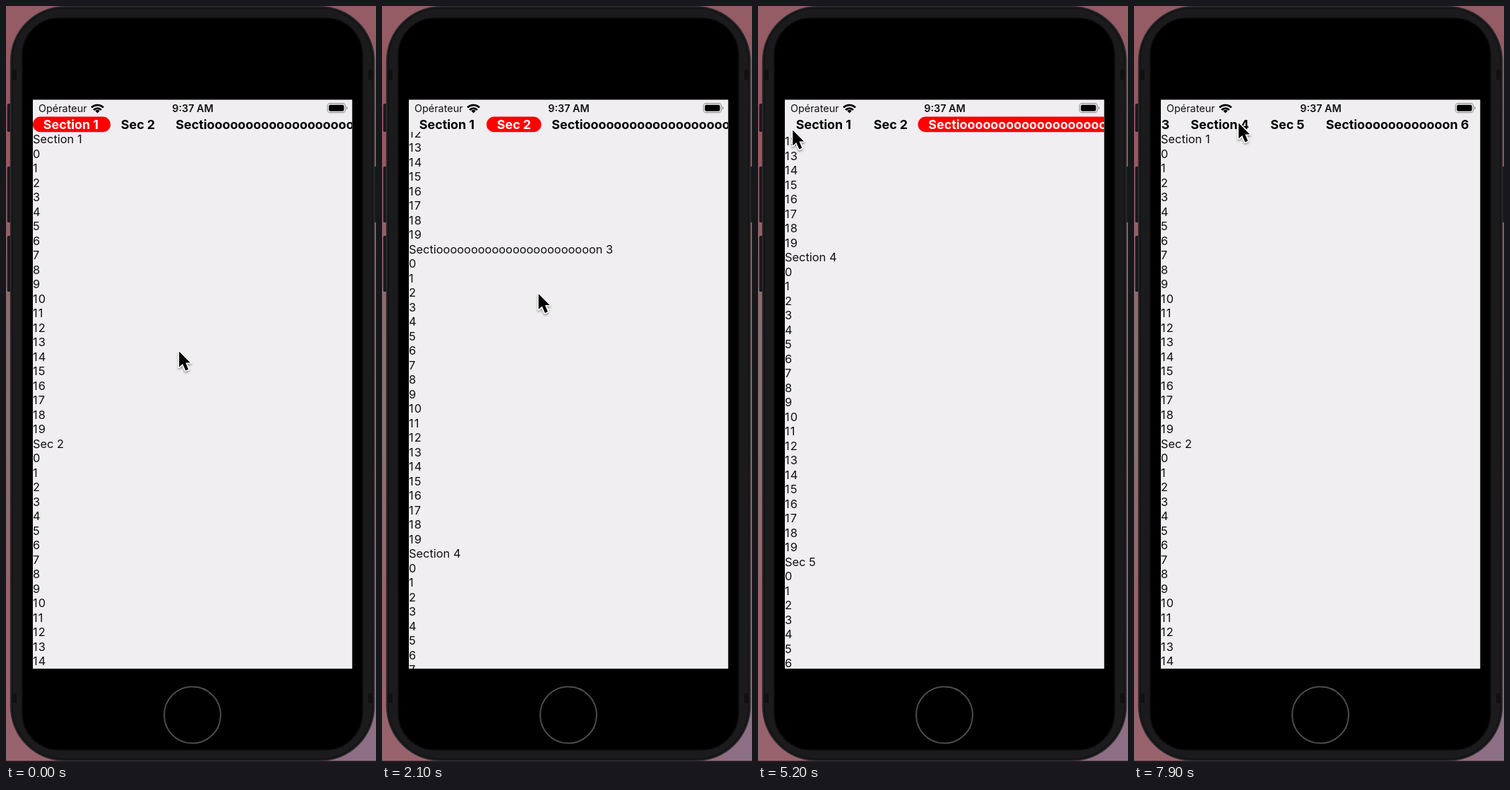
An HTML page for the animation above (8000 ms loop, 524 px wide and 1069 px high).

```html
<!DOCTYPE html>
<html lang="fr">
<head>
<meta charset="utf-8">
<title>Section tabs</title>
<style>
html, body { margin: 0; width: 100%; height: 100%; overflow: hidden; background: #8d6067; }
svg { display: block; width: 100%; height: 100%; }
text { font-family: Inter, "Open Sans", sans-serif; white-space: pre; }
.row { font-size: 16.4px; fill: #111; }
.number { letter-spacing: 1px; }
.tab { font-size: 17.87px; font-weight: 700; }
.status { font-size: 14.4px; fill: #111; }
</style>
</head>
<body>
<svg viewBox="0 0 524 1069">
  <defs>
    <linearGradient id="wall" x2="0" y2="1">
      <stop offset="0" stop-color="#945c65"/>
      <stop offset=".2" stop-color="#98595f"/>
      <stop offset=".42" stop-color="#8a6d6e"/>
      <stop offset=".58" stop-color="#89706f"/>
      <stop offset=".8" stop-color="#9b6168"/>
      <stop offset="1" stop-color="#98636d"/>
    </linearGradient>
    <radialGradient id="dusk" cx="1" cy="1" r=".45">
      <stop offset="0" stop-color="#8c7088"/>
      <stop offset="1" stop-color="#8c7088" stop-opacity="0"/>
    </radialGradient>
    <clipPath id="listClip"><rect x="38" y="178" width="452" height="759"/></clipPath>
    <clipPath id="tabClip"><rect x="38" y="154" width="452" height="26"/></clipPath>
    <filter id="shadow" x="-50%" y="-50%" width="200%" height="200%">
      <feDropShadow dx="0" dy="2" stdDeviation="1.8" flood-opacity=".4"/>
    </filter>
  </defs>

  <rect width="524" height="1069" fill="url(#wall)"/>
  <rect width="524" height="1069" fill="url(#dusk)"/>
  <rect y="1067.5" width="524" height="1.5" fill="#1b1517"/>
  <g fill="#19191b">
    <rect x="1.7" y="138" width="9" height="40" rx="2"/>
    <rect x="1.7" y="227" width="9" height="79" rx="2"/>
    <rect x="1.7" y="325" width="9" height="79" rx="2"/>
    <rect x="516" y="227" width="9" height="79" rx="2"/>
  </g>
  <rect x="6.5" y=".7" width="515" height="1066.6" rx="77" fill="#1b1b1d" stroke="#2e2e31" stroke-width="1.5"/>
  <rect x="9" y="3.2" width="510" height="1061.6" rx="74" fill="none" stroke="#141416" stroke-width="2"/>
  <g fill="#111112">
    <rect x="8" y="90" width="7" height="14"/><rect x="513" y="90" width="7" height="14"/>
    <rect x="8" y="972" width="7" height="14"/><rect x="513" y="972" width="7" height="14"/>
  </g>
  <rect x="23" y="17" width="482" height="1035" rx="52" stroke="#0d0d0e" stroke-width="1.5"/>
  <circle cx="264" cy="1002.5" r="40" fill="none" stroke="#4c4c4c" stroke-width="2"/>
  <rect x="38" y="132.5" width="452.3" height="804.5" fill="#f0eef1"/>

  <text class="status" x="46" y="150">Opérateur</text>
  <text class="status" x="264.5" y="150" text-anchor="middle" font-weight="600">9:37 AM</text>
  <g fill="none" stroke="#000" stroke-width="2.8">
    <path d="M121 143.6a12 12 0 0 1 17 0M124.1 147a7.6 7.6 0 0 1 10.8 0"/>
    <path d="M129.5 151.6l-3.2-3.3a4.5 4.5 0 0 1 6.4 0z" fill="#000" stroke="none"/>
  </g>
  <rect x="455.2" y="137.7" width="25.4" height="13" rx="3.8" fill="none" stroke="#969498" stroke-width="1.2"/>
  <rect x="457.2" y="139.7" width="21.4" height="9" rx="2"/>
  <path d="M482 142v4.6q1.6-.8 1.6-2.3t-1.6-2.3z" fill="#969498"/>

  <g clip-path="url(#listClip)"><g id="list"></g></g>
  <g clip-path="url(#tabClip)"><g id="tabs"><rect id="pill" y="156.5" height="21.8" rx="10.9" fill="#fe0000"/></g></g>
  <path id="cursor" d="M.2.6V22.6L5.2 18 9.3 27.4 13.3 25.7 9.4 16.4H16Z" stroke="#fff" stroke-width="3"
    stroke-linejoin="round" paint-order="stroke" filter="url(#shadow)"/>
</svg>
<script>
const LOOP = 8000, STEP = 100, ROW = 20.5, ROWS = 20;
const $ = id => document.getElementById(id);
const long = n => "Secti" + "o".repeat(n) + "n ";
const names = ["Section 1", "Sec 2", long(23) + 3, "Section 4", "Sec 5", long(12) + 6];
const widths = [110, 77.5, 353, 113, 78.5, 233];
const starts = widths.map((_, i) => widths.slice(0, i).reduce((a, b) => a + b, 38));

function addText(parent, cls, x, y, str) {
  const el = document.createElementNS("http://www.w3.org/2000/svg", "text");
  el.setAttribute("class", cls);
  el.setAttribute("x", x);
  el.setAttribute("y", y);
  el.textContent = str;
  return parent.appendChild(el);
}

names.forEach((name, s) => {
  for (let r = 0; r <= ROWS; r++)
    addText($("list"), r ? "row number" : "row", 38, 194 + (s * (ROWS + 1) + r) * ROW, r ? r - 1 : name);
});
const labels = names.map((name, i) => addText($("tabs"), "tab", starts[i] + 14.8, 174, name));

// Easing takes the progress and the duration of its segment.
const linear = s => s;
const push = s => s * s;
const smooth = s => s * s * (3 - 2 * s);
const glide = (s, d) => (1 - Math.exp(-s * d / 500)) / (1 - Math.exp(-d / 500));

// Keys are [time, value, easing into this key]; no easing means hold, then jump.
function track(keys, t) {
  const i = keys.findIndex(k => k[0] > t);
  if (i < 0) return keys[keys.length - 1][1];
  const [t0, v0] = keys[i - 1], [t1, v1, ease] = keys[i], d = t1 - t0;
  return ease ? v0 + (v1 - v0) * ease((t - t0) / d, d) : v0;
}

const listScroll = [[0, 0], [400, 0], [900, 190, push], [1700, 693, glide], [2000, 693],
  [2200, 743, push], [4200, 1124.5, glide], [5500, 1124.5], [5900, 0, smooth]];
const tabScroll = [[0, 0], [2380, 0], [2730, 138.5, smooth], [4450, 138.5], [4750, 10, smooth],
  [5200, -1, glide], [5500, -1], [5600, 0, smooth], [6250, 0], [6600, 215.5, linear], [7600, 513, glide]];
const selected = [[0, 0], [1172, 1], [2380, 2], [5500, 0]];
const cursorX = [[0, 245], [400, 245], [900, 228, push], [1400, 201, smooth], [2000, 221, smooth],
  [2200, 223, push], [3300, 223], [4200, 155, smooth], [4450, 155], [4750, 283, smooth],
  [5200, 49, smooth], [5700, 49], [6200, 253, smooth], [6250, 253], [6600, 38, linear],
  [6900, 38], [7700, 148, smooth]];
const cursorY = [[0, 488], [400, 488], [900, 298, push], [1400, 470, smooth], [2000, 419, smooth],
  [2200, 369, push], [3300, 369], [4200, 166, smooth], [4750, 168, smooth], [5200, 175, smooth],
  [5700, 175], [6200, 165, smooth], [6600, 161, linear], [6900, 161], [7700, 165, smooth]];

// The pill slides to each newly selected tab in 350 ms.
function pillValue(values, t) {
  const i = selected.filter(k => k[0] <= t).length - 1;
  const to = values[selected[i][1]];
  if (!i) return to;
  const from = values[selected[i - 1][1]];
  return from + (to - from) * smooth(Math.min(1, (t - selected[i][0]) / 350));
}

function draw(t) {
  const move = (id, x, y) => $(id).setAttribute("transform", `translate(${x} ${y})`);
  move("list", 0, -track(listScroll, t));
  move("tabs", -track(tabScroll, t), 0);
  move("cursor", track(cursorX, t), track(cursorY, t));
  $("pill").setAttribute("x", pillValue(starts, t));
  $("pill").setAttribute("width", pillValue(widths, t));
  const current = track(selected, t);
  labels.forEach((el, i) => el.setAttribute("fill", i === current ? "#fff" : "#000"));
}

const begin = performance.now();
function tick() {
  const t = (performance.now() - begin) % LOOP;
  draw(Math.floor(t / STEP) * STEP);
  requestAnimationFrame(tick);
}
tick();
</script>
</body>
</html>
```
